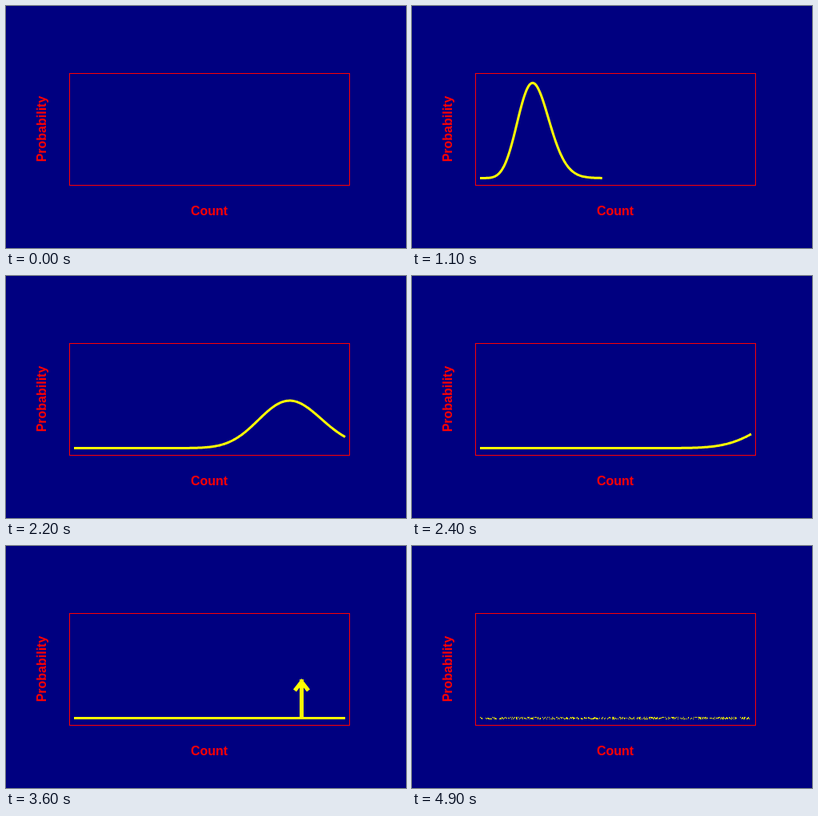
Recreate the animation shown at these times as an HTML page with a canvas. Size 500 px wide and 303 px high, loop 5000 ms.

```html
<!DOCTYPE html>
<html lang="en">
<head>
<meta charset="utf-8">
<title>Probability of a count</title>
<style>
  html, body { margin: 0; width: 100%; height: 100%; overflow: hidden; background: #000080; }
  canvas { display: block; }
</style>
</head>
<body>
<canvas id="stage" width="500" height="303"></canvas>
<script>
const ctx = document.getElementById('stage').getContext('2d');
const LOOP = 5000, STEP = 100;
const LEFT = 85, RIGHT = 424, BASE = 215.5;
const ZERO_X = 85.7, UNIT = 5.66, SCALE = 1031;
const ARROW_X = 369.5, ARROW_FOOT = 214, ARROW_TOP = 167;

// Poisson density for real counts, with Gosper's factorial.
function poisson(n, mean) {
  n = Math.max(n, 1e-9);
  const logFactorial = n * Math.log(n) - n + Math.log(2 * Math.PI * n + Math.PI / 3) / 2;
  return Math.exp(n * Math.log(mean) - mean - logFactorial);
}

function strokePath(points, width) {
  ctx.lineWidth = width;
  ctx.beginPath();
  points.forEach(([x, y]) => ctx.lineTo(x, y));
  ctx.stroke();
}

// Draws the curve up to the given share of its length.
function drawCurve(mean, share = 1) {
  const points = [];
  let length = 0;
  for (let x = LEFT; x <= RIGHT; x++) {
    const y = BASE - SCALE * poisson((x - ZERO_X) / UNIT, mean);
    if (points.length) length += Math.hypot(1, y - points.at(-1)[1]);
    points.push([x, y]);
  }
  if (share < 1) ctx.setLineDash([Math.max(3, length * share), length]);
  strokePath(points, 3);
  ctx.setLineDash([]);
}

// The shaft takes three strokes, each wing of the head one more.
function drawArrow(strokes) {
  const shaft = Math.min(strokes, 3) / 3;
  const height = (ARROW_FOOT - ARROW_TOP) * shaft;
  ctx.fillRect(ARROW_X - 2.5, ARROW_FOOT - height, 5, height + 1);
  const tip = [ARROW_X, ARROW_TOP + 3];
  const wing = side => [ARROW_X + side * 8.5, ARROW_TOP + 14];
  if (strokes === 4) strokePath([wing(-1), tip], 5);
  if (strokes === 5) strokePath([wing(-1), tip, wing(1)], 5);
}

function drawBaseline(density = 1) {
  if (density === 1) {
    ctx.fillRect(LEFT, BASE - 1.5, RIGHT - LEFT, 3);
    return;
  }
  let seed = 7;
  for (let x = LEFT; x < RIGHT; x++) {
    for (let row = 0; row < 3; row++) {
      seed = (Math.imul(seed, 1664525) + 1013904223) >>> 0;
      if (seed / 2 ** 32 < density) ctx.fillRect(x, BASE - 1.5 + row, 1, 1);
    }
  }
}

function drawAxes() {
  ctx.strokeStyle = ctx.fillStyle = '#f00';
  ctx.lineWidth = 1;
  ctx.strokeRect(79.5, 84.5, 350, 140);
  ctx.font = 'bold 16px "Liberation Sans", Arial, sans-serif';
  ctx.textAlign = 'center';
  ctx.fillText('Count', 254, 262);
  ctx.save();
  ctx.translate(50, 154);
  ctx.rotate(-Math.PI / 2);
  ctx.fillText('Probability', 0, 0);
  ctx.restore();
}

function draw(t) {
  ctx.fillStyle = '#000080';
  ctx.fillRect(0, 0, 500, 303);
  drawAxes();
  ctx.strokeStyle = ctx.fillStyle = '#ff0';
  if (t < 600) return;
  if (t < 2000) {
    drawCurve(12, Math.min(1, (t - 600) / 800));
  } else if (t < 2600) {
    drawCurve(24 + 12 * (t - 2000) / STEP);
  } else {
    drawBaseline(t < 4800 ? 1 : (LOOP - t) / 300);
    const strokes = t < 3800 ? Math.min(5, (t - 3100) / STEP) : (4200 - t) / STEP;
    if (strokes > 0) drawArrow(strokes);
  }
}

function tick() {
  const t = performance.now() % LOOP;
  draw(Math.floor(t / STEP) * STEP);
  requestAnimationFrame(tick);
}
tick();
</script>
</body>
</html>
```
